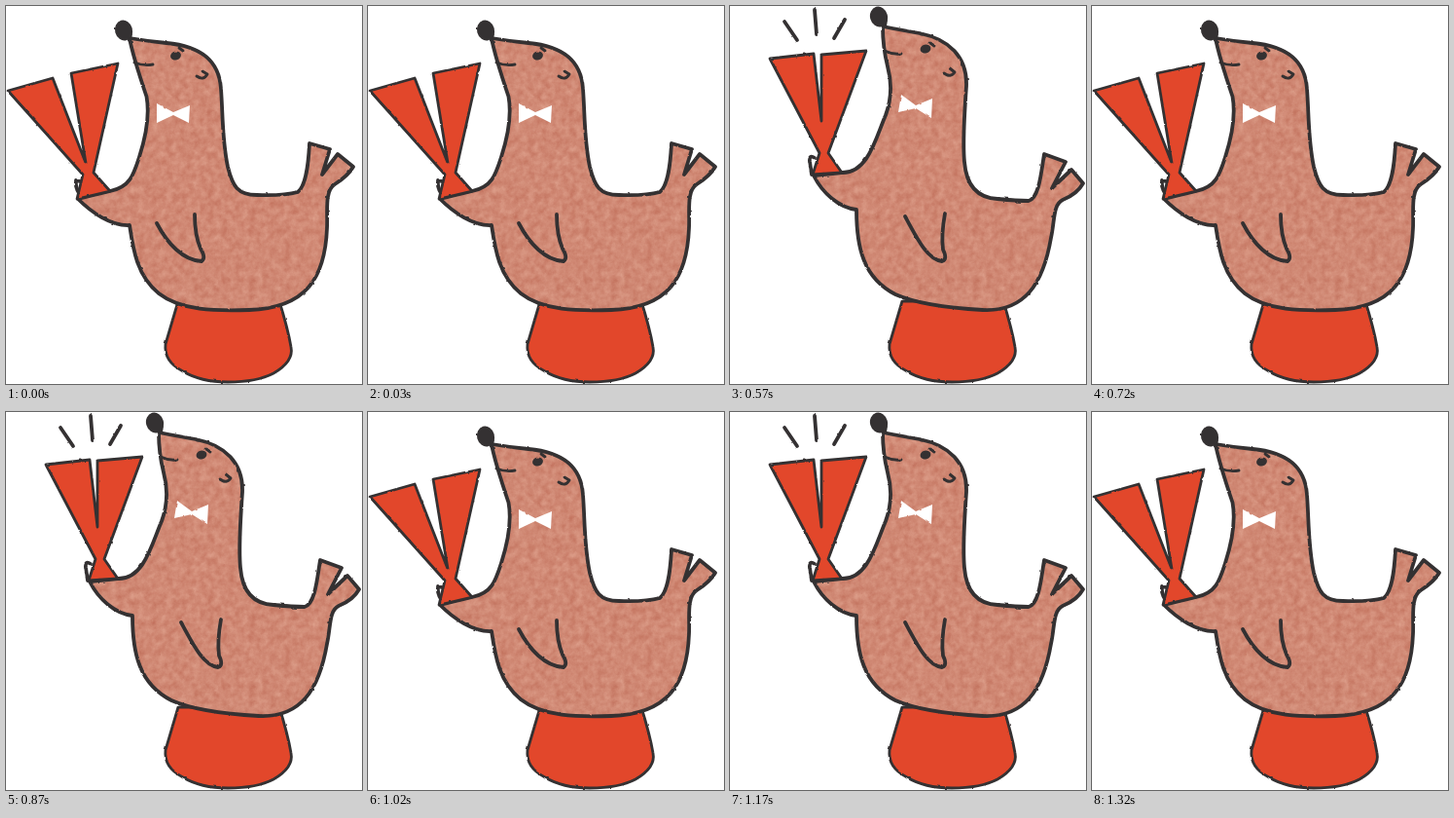
Animation of 366x388 px, one loop 1.77 s. Source, as an HTML page:

```html
<!DOCTYPE html>
<html lang="en">
<head>
<meta charset="utf-8">
<title>Clapping seal</title>
<style>
  html, body { margin: 0; height: 100%; overflow: hidden; background: #fff; }
  svg { display: block; width: 100%; height: 100%; }
  path { fill: none; stroke: #343132; stroke-width: 3.8; stroke-linecap: round; stroke-linejoin: round; }
  .red { fill: #e2472b; stroke-width: 2.8; }
  .skin { fill: #d08874; stroke: none; filter: url(#paper); }
  .face { stroke-width: 2.9; }
  .bow { fill: #fff; stroke: none; }
  .ink { fill: #343132; }
  .rough { filter: url(#rough); }
</style>
</head>
<body>
<svg viewBox="0 0 366 388">
  <filter id="paper" x="0" y="0" width="100%" height="100%" color-interpolation-filters="sRGB">
    <feTurbulence type="fractalNoise" baseFrequency=".14" numOctaves="4" seed="4"/>
    <feColorMatrix values=".12 0 0 0 .755  .2 0 0 0 .435  .2 0 0 0 .355  0 0 0 0 1"/>
    <feComposite in2="SourceGraphic" operator="in"/>
  </filter>
  <filter id="rough" filterUnits="userSpaceOnUse" x="0" y="0" width="366" height="388" color-interpolation-filters="sRGB">
    <feTurbulence type="fractalNoise" baseFrequency=".15" numOctaves="2" seed="7"/>
    <feDisplacementMap in="SourceGraphic" scale="2" xChannelSelector="R" yChannelSelector="G"/>
  </filter>
  <g class="rough">
    <path class="red" d="M177 303L164 347Q162 365 182 375Q200 386 228 386Q258 386 275 377Q296 365 293 350Q290 332 281 303Z"/>
    <g id="open"></g>
    <g id="shut"></g>
  </g>
</svg>
<script>
const poses = {
  open: {
    body: 'M127 33Q145 36 165 38C198 41 219 54 221 85C223 110 222 137 228 165C233 185 238 194 258 194Q285 195 300 191C309 184 311 160 312 141L333 147L325 173L341 152L357 165Q352 174 338 183C327 190 331 212 330 228C328 280 308 310 250 312C215 313 180 313 157 295C135 277 131 252 127 225C108 226 88 212 74 198L107 190C127 186 131 174 137 155Q149 118 144.500 93Q130 50 127 33Z',
    thumb: 'M76 180L72 179Q71 186 75 192',
    clapper: 'M2 87L48 74L80 156L82 161L67 69L115 59L90 171L107 190L73 198L79 173Z',
    limbs: 'M155 223C166 244 182 261 201 262Q206 259 200 249Q194 235 194 214',
    face: 'M132 58Q142 62 151 60M178 43L182 46M196 72Q203 77 207 70L202 67',
    bow: 'M155 100L172 109L189 102L188 120L172 112L155 120Z',
    nose: [121, 25], eye: [174.5, 51]
  },
  shut: {
    body: 'M157 21Q178 25 195 28C225 34 244 52 243 82C241 110 239 140 241 160C243 185 255 197 275 198Q295 200 307 200C318 197 320 170 323 152L345 160L331 187L351 168L363 182Q357 193 342 199C332 204 334 220 330 238C322 285 303 314 260 312C225 310 190 305 170 296C137 279 130 248 130 209C112 207 95 192 86 174L115 171C142 172 150 135 160 112Q169 88 162 62Q157 42 157 21Z',
    thumb: 'M87 156Q81 152 82 160L84 173',
    clapper: 'M41 54L86 49L94 118L94 50L140 46L101 151L115 171L85 173L92 151Z',
    limbs: 'M180 216C193 240 203 260 218 262Q224 260 219 250Q217 235 221 213M56 16L69 35M87 4L89 29M118 14L107 33',
    face: 'M159 46Q167 50 176 49M206 38L210 41M220 69Q227 74 231 68L226 64',
    bow: 'M176 91L191 102L208 95L207 115L191 105L173 109Z',
    nose: [153, 11], eye: [201, 44]
  }
};

const path = (d, cls = '') => `<path class="${cls}" d="${d}"/>`;
const dot = ([x, y], rx, ry) =>
  `<ellipse class="ink" rx="${rx}" ry="${ry}" transform="translate(${x} ${y}) rotate(-15)"/>`;

for (const [id, p] of Object.entries(poses)) {
  const [x, y] = p.nose;
  document.getElementById(id).innerHTML =
    path(p.body, 'skin') + path(p.body) + path(p.thumb) + path(p.clapper, 'red') +
    path(p.limbs) + path(p.face, 'face') + path(p.bow, 'bow') +
    path(`M${x} ${y}L${x + 6} ${y + 10}L${x + 7} ${y + 4}Z`, 'ink') +
    dot(p.nose, 9, 10.5) + dot(p.eye, 5.5, 4.5);
}

const loop = 1770, first = 570, beat = 150, beats = 5;

function draw(now) {
  const step = Math.floor((now % loop - first) / beat);
  const clap = step >= 0 && step < beats && step % 2 === 0;
  document.getElementById('open').style.display = clap ? 'none' : '';
  document.getElementById('shut').style.display = clap ? '' : 'none';
}

const start = performance.now();
function tick() {
  draw(performance.now() - start);
  requestAnimationFrame(tick);
}
tick();
</script>
</body>
</html>
```
